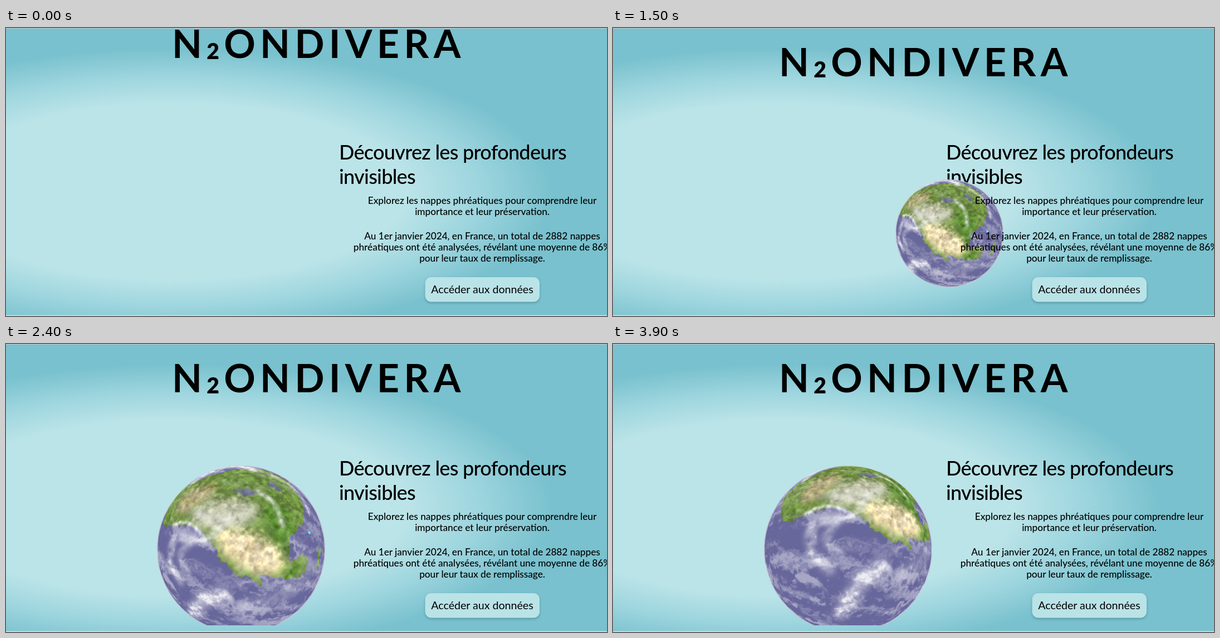
Animation of 1079x519 px, one loop 4000 ms. Source, as an HTML page with a canvas:

```html
<!DOCTYPE html>
<html lang="fr">
<head>
<meta charset="utf-8">
<title>Nappes phréatiques</title>
<style>
html, body { margin: 0; width: 100%; height: 100%; overflow: hidden; }
body {
  position: relative;
  background: radial-gradient(1101px 417px at 300px 295px, #bbe4e8 38%, #9dd5de 50%, #79c1ce 62%);
}
svg, canvas { position: absolute; left: 0; top: 0; display: block; }
text { font-family: Lato, "Open Sans", sans-serif; fill: #000; }
#title { font-size: 70px; font-weight: 700; letter-spacing: 8.3px; }
#title .sub { font-size: 39px; font-weight: 900; }
.head { font-size: 36px; font-weight: 500; letter-spacing: -.7px; }
.copy { font-size: 17.2px; font-weight: 500; text-anchor: middle; }
.label { font-size: 19.6px; text-anchor: middle; }
.button { fill: #bae3e7; filter: drop-shadow(0 2px 2px rgba(20, 70, 85, .35)); }
</style>
</head>
<body>
<svg width="1079" height="519" viewBox="0 0 1079 519">
  <rect width="1079" height="1" fill="#b9cbd9"/>
  <rect y="517.5" width="1079" height="1.5" fill="#cbe5df"/>
  <text id="title" x="298" y="87">N<tspan class="sub" dy="2">2</tspan><tspan dy="-2">ONDIVERA</tspan></text>
  <text class="head" x="598" y="237">Découvrez les profondeurs</text>
  <text class="head" x="598" y="280.5">invisibles</text>
</svg>
<canvas id="globe" width="1079" height="507"></canvas>
<svg width="1079" height="519" viewBox="0 0 1079 519">
  <text class="copy" x="855" y="316.5">Explorez les nappes phréatiques pour comprendre leur</text>
  <text class="copy" x="855" y="336.5">importance et leur préservation.</text>
  <text class="copy" x="855" y="380.5">Au 1er janvier 2024, en France, un total de 2882 nappes</text>
  <text class="copy" x="855" y="400.5">phréatiques ont été analysées, révélant une moyenne de 86%</text>
  <text class="copy" x="855" y="420.5">pour leur taux de remplissage.</text>
  <rect class="button" x="752.5" y="449" width="205.5" height="44.5" rx="11"/>
  <text class="label" x="855" y="477.5">Accéder aux données</text>
</svg>
<script>
const LOOP = 4000, STEP = 100;
const SIZE = 1024, HALF = SIZE / 2, SCALE = 230;   // surface map, px per radian
const DIST = 2.5, LIMB = 1 / Math.sqrt(DIST * DIST - 1);
const REST = { x: 421, y: 370, r: 151, tilt: 38 }; // pose in which the map is drawn
const RAD = Math.PI / 180;

const clamp = (v, a = 0, b = 1) => Math.max(a, Math.min(b, v));
const smooth = u => u * u * (3 - 2 * u);
const mix = (a, b, u) => a + (b - a) * u;

// Angle on the sphere seen at a distance rho (0..1) from the disc centre
function viewAngle(rho) {
  const s = rho * LIMB;
  return Math.asin(Math.min(1, s * DIST / Math.sqrt(1 + s * s))) - Math.atan(s);
}

function toMap([x, y]) {
  const dx = (x - REST.x) / REST.r, dy = (y - REST.y) / REST.r;
  const rho = Math.hypot(dx, dy) || 1e-6;
  const k = viewAngle(Math.min(1, rho)) * SCALE / rho;
  return [HALF + dx * k, HALF + dy * k];
}

function hash(x, y) {
  let h = Math.imul(x, 374761393) ^ Math.imul(y, 668265263);
  h = Math.imul(h ^ h >>> 13, 1274126177);
  return ((h ^ h >>> 16) >>> 0) / 4294967296;
}

function noise(x, y) {
  const i = Math.floor(x), j = Math.floor(y), u = smooth(x - i);
  return mix(mix(hash(i, j), hash(i + 1, j), u),
    mix(hash(i, j + 1), hash(i + 1, j + 1), u), smooth(y - j));
}

// Fractal noise, centred on zero
function fbm(x, y) {
  let sum = -.47, amp = .5;
  for (let o = 0; o < 4; o++) {
    sum += amp * noise(x, y);
    x = x * 2.03 + 17; y = y * 2.03 + 31; amp /= 2;
  }
  return sum;
}

function layer() {
  const c = document.createElement('canvas');
  c.width = c.height = SIZE;
  return c.getContext('2d', { willReadFrequently: true });
}

const pixels = ctx => ctx.getImageData(0, 0, SIZE, SIZE).data;

// Rounded path through the middles of the given corners
function trace(ctx, corners, closed) {
  const p = corners.map(toMap), n = p.length;
  const mid = (a, b) => [(a[0] + b[0]) / 2, (a[1] + b[1]) / 2];
  ctx.beginPath();
  ctx.moveTo(...(closed ? mid(p[n - 1], p[0]) : p[0]));
  for (let i = closed ? 0 : 1; i < n; i++) {
    const last = !closed && i === n - 1;
    ctx.quadraticCurveTo(...p[i], ...(last ? p[i] : mid(p[i], p[(i + 1) % n])));
  }
}

function blob(ctx, color, x, y, rx, ry, turn = 0) {
  ctx.fillStyle = color;
  ctx.beginPath();
  ctx.ellipse(...toMap([x, y]), rx, ry, turn, 0, 7);
  ctx.fill();
}

function paintLand() {
  const ctx = layer();
  ctx.fillStyle = '#6f8f42';
  trace(ctx, [[278, 335], [305, 272], [365, 238], [475, 228], [545, 300], [514, 345], [508, 388],
    [540, 370], [552, 395], [510, 426], [462, 400], [478, 434], [395, 394], [384, 362],
    [340, 322], [305, 324]], true);
  ctx.fill();
  blob(ctx, '#6f8f42', 564, 377, 8, 28, .1);
  blob(ctx, '#58cfd8', 547, 335, 6, 4, .4);
  ctx.globalCompositeOperation = 'source-atop';
  ctx.filter = 'blur(9px)';
  blob(ctx, '#aaa06c', 340, 275, 55, 30, -.5);
  blob(ctx, '#b3b692', 395, 300, 65, 34, -.2);
  blob(ctx, '#57872d', 500, 320, 28, 55, -.3);
  blob(ctx, '#efdcae', 450, 370, 72, 33, .42);
  blob(ctx, '#558a2c', 522, 405, 24, 9, -.4);
  ctx.globalCompositeOperation = 'source-over';
  ctx.filter = 'blur(3px)';
  blob(ctx, '#6c6b9f', 433, 263, 22, 8, .1);
  blob(ctx, '#6c6b9f', 484, 254, 18, 7, .7);
  return pixels(ctx);
}

function paintClouds() {
  const ctx = layer();
  ctx.lineCap = 'round';
  const streak = (width, alpha, ...corners) => {
    ctx.filter = `blur(${width * .4}px)`;
    ctx.lineWidth = width;
    ctx.strokeStyle = `rgba(255,255,255,${alpha})`;
    trace(ctx, corners);
    ctx.stroke();
  };
  streak(6, .95, [302, 326], [330, 314], [368, 349]);
  streak(12, .7, [315, 347], [360, 360], [396, 322]);
  streak(17, .7, [306, 348], [294, 385], [318, 428]);
  streak(13, .55, [335, 357], [310, 378], [334, 410]);
  streak(23, 1, [398, 448], [362, 456], [340, 492]);
  streak(28, .35, [440, 470], [500, 455], [540, 415]);
  streak(26, 1, [340, 246], [385, 222], [445, 225]);
  streak(12, .6, [470, 232], [515, 255], [545, 300]);
  streak(9, .75, [455, 262], [482, 275], [502, 322]);
  streak(26, .5, [345, 308], [400, 316], [445, 300]);
  return pixels(ctx);
}

// Bakes oceans, land and clouds into one RGB map
function bakeMap() {
  const land = paintLand(), cloud = paintClouds();
  const map = new Uint8ClampedArray(SIZE * SIZE * 3);
  const sea = [104, 103, 155], white = [243, 243, 247];
  for (let y = 0; y < SIZE; y++) for (let x = 0; x < SIZE; x++) {
    const n = fbm(x / 20, y / 20), m = fbm(x / 9 + 90, y / 9 + 40);
    const lx = clamp(Math.round(x + n * 22), 0, SIZE - 1);
    const ly = clamp(Math.round(y + m * 20), 0, SIZE - 1);
    const li = (ly * SIZE + lx) * 4, a = land[li + 3] / 255;
    const wisp = fbm((x + y * .4) / 70 + n * 3, (y - x * .4) / 24 + m);
    const haze = clamp((wisp + .06) * 1.5, 0, .45) * (1 - .5 * a);
    const c = clamp(cloud[(y * SIZE + x) * 4 + 3] / 255 * (.85 + 1.3 * m + n) + haze, 0, .96);
    const shade = 1 + a * m * .8;
    for (let k = 0; k < 3; k++) {
      const ground = mix(sea[k], land[li + k], a) * shade;
      map[(y * SIZE + x) * 3 + k] = mix(ground, white[k], c);
    }
  }
  return map;
}

const map = bakeMap();
const title = document.getElementById('title');
const ctx = document.getElementById('globe').getContext('2d');

function drawGlobe(cx, cy, r, yaw, tilt) {
  const left = Math.floor(cx - r - 1), top = Math.floor(cy - r - 1), side = Math.ceil(2 * r + 3);
  const img = ctx.createImageData(side, side), out = img.data;
  const ct = Math.cos(tilt), st = Math.sin(tilt), cw = Math.cos(yaw), sw = Math.sin(yaw);
  const c0 = Math.cos(REST.tilt * RAD), s0 = Math.sin(REST.tilt * RAD);
  for (let j = 0; j < side; j++) for (let i = 0; i < side; i++) {
    const dx = (left + i + .5 - cx) / r, dy = (cy - top - j - .5) / r;
    const rho = Math.hypot(dx, dy) || 1e-6;
    const cover = clamp((1 - rho) * r + .5);
    if (!cover) continue;
    const angle = viewAngle(Math.min(1, rho)), k = Math.sin(angle) / rho;
    const vx = dx * k, vy = dy * k, vz = Math.cos(angle);
    // Undo the current turn, then apply the resting tilt
    const y = vy * ct + vz * st, z = vz * ct - vy * st;
    const x = vx * cw - z * sw, z1 = vx * sw + z * cw;
    const ry = y * c0 - z1 * s0, rz = y * s0 + z1 * c0;
    const g = Math.acos(clamp(rz, -1, 1)) * SCALE / (Math.hypot(x, ry) || 1e-6);
    const mx = clamp(HALF + x * g, 0, SIZE - 2), my = clamp(HALF - ry * g, 0, SIZE - 2);
    const ix = mx | 0, iy = my | 0, fx = mx - ix, fy = my - iy;
    const p = (iy * SIZE + ix) * 3, q = p + SIZE * 3, o = (j * side + i) * 4;
    const rim = clamp(1.8 - (1 - rho) * r) * .6;
    for (let n = 0; n < 3; n++) {
      const v = mix(mix(map[p + n], map[p + n + 3], fx), mix(map[q + n], map[q + n + 3], fx), fy);
      out[o + n] = mix(v, 240, rim);
    }
    out[o + 3] = 255 * cover;
  }
  ctx.putImageData(img, left, top);
}

// Time, centre x and radius along the approach
const PATH = [[500, 481, 4], [700, 472, 11], [1200, 587, 45], [1500, 604, 97],
  [1800, 497, 135], [2000, 457, 143], [2400, 422, 151]];

// Smooth curve through one column of the path
function along(t, col) {
  const last = PATH.length - 1;
  t = clamp(t, PATH[0][0], PATH[last][0]);
  let i = 0;
  while (i < last - 1 && t > PATH[i + 1][0]) i++;
  const slope = j => {
    const p = PATH[Math.max(0, j - 1)], q = PATH[Math.min(last, j + 1)];
    return (q[col] - p[col]) / (q[0] - p[0]);
  };
  const a = PATH[i], b = PATH[i + 1], d = b[0] - a[0], u = (t - a[0]) / d, w = 1 - u;
  return mix(a[col], b[col], smooth(u)) + d * u * w * (slope(i) * w - slope(i + 1) * u);
}

function render(t) {
  const rest = 1 - clamp(t / 600);
  title.setAttribute('y', 87 - 33 * rest * rest);
  ctx.clearRect(0, 0, 1079, 507);
  if (t < PATH[0][0]) return;
  const drag = clamp((t - 2900) / 1000) ** 3.3;
  const yaw = 23 * drag - 14 * Math.exp((1500 - t) / 560);
  const tilt = 43 - 5 * smooth(clamp((t - 1500) / 1400)) - 12 * drag;
  drawGlobe(along(t, 1), REST.y, along(t, 2), yaw * RAD, tilt * RAD);
}

let shown = -1;
const start = performance.now();
function tick() {
  const t = Math.floor((performance.now() - start) % LOOP / STEP) * STEP;
  if (t !== shown) render(shown = t);
  requestAnimationFrame(tick);
}
tick();
</script>
</body>
</html>
```
